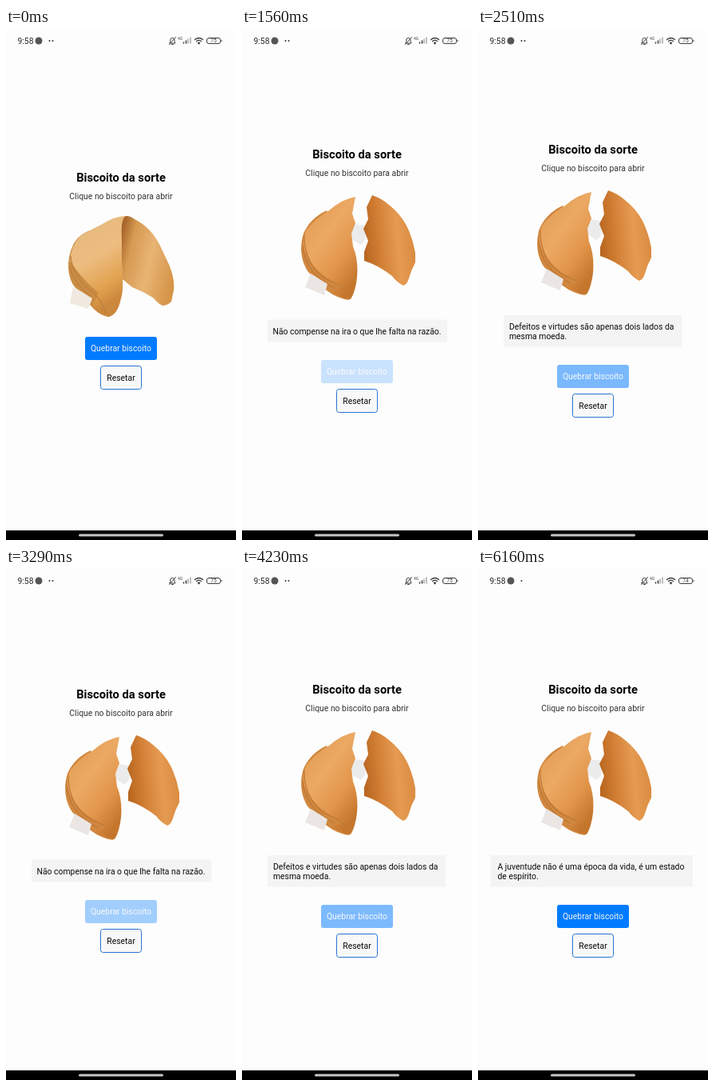
An HTML page that plays this animation: 288x640 px, repeating every 6200 ms.

```html
<!DOCTYPE html>
<html lang="pt">
<head>
<meta charset="utf-8">
<title>Biscoito da sorte</title>
<style>
html, body { margin: 0; width: 100%; height: 100%; overflow: hidden; background: #fdfdfd; }
svg { display: block; width: 288px; height: 640px; }
text { font: 10.4px Roboto, "Noto Sans", sans-serif; fill: #0c0c0c; }
.mid { text-anchor: middle; }
.status { fill: none; stroke: #3c3c3c; stroke-width: 1; stroke-linecap: round; }
</style>
</head>
<body>
<svg viewBox="0 0 288 640">
  <defs>
    <linearGradient id="closedLeft" x1="0" y1="0" x2=".35" y2="1">
      <stop offset="0" stop-color="#e4b87c"/><stop offset=".5" stop-color="#ecbd80"/>
      <stop offset=".8" stop-color="#e3a352"/><stop offset="1" stop-color="#cb873b"/>
    </linearGradient>
    <linearGradient id="closedRight" x1="0" y1=".3" x2="1" y2=".7">
      <stop offset="0" stop-color="#a8662a"/><stop offset=".2" stop-color="#d79a52"/>
      <stop offset=".55" stop-color="#e8b474"/><stop offset="1" stop-color="#d59447"/>
    </linearGradient>
    <linearGradient id="openLeft" x1="0" y1="0" x2=".7" y2="1">
      <stop offset="0" stop-color="#e0984c"/><stop offset=".45" stop-color="#eba964"/>
      <stop offset=".75" stop-color="#e2954a"/><stop offset="1" stop-color="#c4762c"/>
    </linearGradient>
    <linearGradient id="openRight" x1="0" y1=".5" x2="1" y2=".35">
      <stop offset="0" stop-color="#b8651f"/><stop offset=".3" stop-color="#d27f35"/>
      <stop offset=".65" stop-color="#e59b52"/><stop offset="1" stop-color="#d98a3e"/>
    </linearGradient>
  </defs>
  <rect width="288" height="640" fill="#fdfdfd"/>

  <text x="14.5" y="20" style="fill:#2c2c2c">9:58</text>
  <circle cx="41" cy="16" r="4.5" fill="#555"/>
  <circle cx="54.5" cy="16" r="1" fill="#333"/>
  <circle id="dot" cx="58.5" cy="16" r="1" fill="#333"/>
  <g class="status">
    <path d="M205 19h7l-1-2v-2a2.6 2.6 0 0 0-5.2 0v2zM207.500 20.500h2M204.500 20.500l8-9"/>
    <path d="M222.500 19v-1M225.500 19v-3" stroke-width="1.500"/>
    <path d="M228 19v-5M231 19v-7" stroke="#aaa" stroke-width="1.500"/>
    <path d="M236.500 14.500q5-4 10 0M238.500 16.500q3-2.300 6 0M240.500 18.500q1-.8 2 0l-1 1.300z" stroke-width="1.300"/>
    <rect x="251.500" y="12.500" width="17" height="7" rx="2.500"/>
    <path d="M270 15.500v1"/>
  </g>
  <text x="215" y="15" style="font-size:5px;fill:#444">4G</text>
  <text id="battery" class="mid" x="260" y="18.300" style="font-size:6.5px;fill:#444">75</text>

  <g id="heading">
    <text class="mid" x="144" y="192" style="font-size:14.7px;font-weight:700;fill:#000">Biscoito da sorte</text>
    <text class="mid" x="144" y="214" style="fill:#333">Clique no biscoito para abrir</text>

    <g id="closed">
      <path fill="url(#closedRight)" d="M147 236Q153 233 161 239C183 250 191 267 200 287Q212 310 210 328L207 342Q202 347 196 347Q191 345 184 337Q171 329 158 324L146 314L142 254Z"/>
      <path fill="#ca8b42" d="M105 253Q87 260 82 276C76 292 77 309 84 321L106 347Q115 358 128 361L138 349Z"/>
      <path fill="url(#closedLeft)" d="M150 235C143 239 145 256 145 273C144 295 149 324 144 338Q140 358 129 361Q119 360 108 349L116 331Q96 315 80 291Q81 273 93 260Q108 251 119 246Q136 235 150 235Z"/>
      <path fill="none" stroke="#bc8140" stroke-width="1.300" d="M81 285Q83 311 109 331Q122 343 125 357M80 298Q84 319 106 335"/>
      <path fill="#efe9df" d="M84 323L108 338L103 351L80 344Z"/>
    </g>

    <g id="open">
      <path fill="#ebebeb" d="M139 274L156 276L154 294L149 300L135 292Z"/>
      <path fill="#d0873f" d="M106 257Q85 267 77 286C71 305 75 323 83 334L106 357Q119 367 134 369L141 348Z"/>
      <path fill="url(#openLeft)" d="M142 240L138 261L142 273L137 286L139 302Q146 319 144 341Q142 359 136 368Q125 367 111 358L128 352Q91 338 79 309Q74 294 81 281Q93 266 109 257Q125 243 142 240Z"/>
      <path fill="none" stroke="#bf7834" stroke-width="1.300" d="M78 288C77 312 90 339 115 347Q129 353 133 365M76 301C78 326 94 344 116 354"/>
      <path fill="url(#openRight)" d="M163 238Q175 242 184 250Q198 261 206 276Q214 292 217 310V322Q212 331 209 342Q207 349 202 351Q194 347 188 339Q170 325 153 320L153 309L158 295L152 280L158 268L156 253Z"/>
      <path fill="#ebe6e4" d="M86 336L107 349L103 363L79 353Z"/>
    </g>
  </g>

  <g id="note">
    <rect id="noteBox" fill="#f4f4f4"/>
    <text id="line1"></text>
    <text id="line2"></text>
  </g>

  <g id="buttons">
    <g id="breakButton">
      <rect x="99" y="386" width="90" height="29" rx="3" fill="#007bff"/>
      <text class="mid" x="144" y="404" style="fill:#f4f4f4">Quebrar biscoito</text>
    </g>
    <rect x="118.500" y="422.500" width="51" height="29" rx="3" fill="#f8f8f8" stroke="#2873d2"/>
    <text class="mid" x="144" y="441">Resetar</text>
  </g>

  <rect y="628" width="288" height="12" fill="#000"/>
  <rect x="91" y="632.500" width="106" height="3" rx="1.500" fill="#c4c4c4"/>
</svg>
<script>
const LOOP = 6200, FADED = 0.2, FADE_OUT = 150, FADE_IN = 250, RENDER_LAG = 30;
const $ = id => document.getElementById(id);

const anger = { x: 32, w: 225, tx: 38.5, lines: ["Não compense na ira o que lhe falta na razão."] };
const flaws = { x: 32, w: 223, tx: 39, lines: ["Defeitos e virtudes são apenas dois lados da", "mesma moeda."] };
const youth = { x: 16, w: 253, tx: 24.5, lines: ["A juventude não é uma época da vida, é um estado", "de espírito."] };

// [finger down, finger up, message]
const taps = [
  [700, 860, anger], [1400, 1565, anger], [2240, 2400, flaws], [3050, 3213, anger],
  [3950, 4122, flaws], [4760, 4927, flaws], [5480, 5650, youth]
];

const clamp = p => Math.min(1, Math.max(0, p));
const ease = p => p < 0.5 ? 2 * p * p : 1 - 2 * (1 - p) ** 2;
const show = (id, on) => $(id).setAttribute("visibility", on ? "visible" : "hidden");
const shift = (id, dy) => $(id).setAttribute("transform", `translate(0 ${dy})`);
const setAttrs = (id, attrs) => {
  for (const key in attrs) $(id).setAttribute(key, attrs[key]);
};

function buttonOpacity(t) {
  const tap = taps.findLast(([down]) => t >= down);
  if (!tap) return 1;
  const [down, up] = tap;
  return t < up
    ? 1 - (1 - FADED) * ease(clamp((t - down) / FADE_OUT))
    : FADED + (1 - FADED) * ease(clamp((t - up) / FADE_IN));
}

function layout(message) {
  const two = message && message.lines.length > 1;
  const dy = message ? (two ? 35 : 29) : 0;
  shift("heading", -dy);
  shift("buttons", dy);
  show("closed", !message);
  show("open", message);
  show("note", message);
  if (!message) return;
  const { x, w, tx, lines } = message;
  setAttrs("noteBox", { x, y: two ? 359 : 364.5, width: w, height: two ? 39.5 : 28 });
  setAttrs("line1", { x: tx, y: two ? 376.5 : 382.5 });
  setAttrs("line2", { x: tx, y: 388.5 });
  $("line1").textContent = lines[0];
  $("line2").textContent = lines[1] || "";
}

let shown;
function draw(now) {
  const t = now % LOOP;
  const tap = taps.findLast(([, up]) => t >= up + RENDER_LAG);
  const message = tap ? tap[2] : null;
  if (message !== shown) layout(shown = message);
  $("breakButton").setAttribute("opacity", buttonOpacity(t));
  show("dot", t < 4680);
  $("battery").textContent = t < 5600 ? "75" : "74";
  requestAnimationFrame(draw);
}
draw(0);
</script>
</body>
</html>
```
